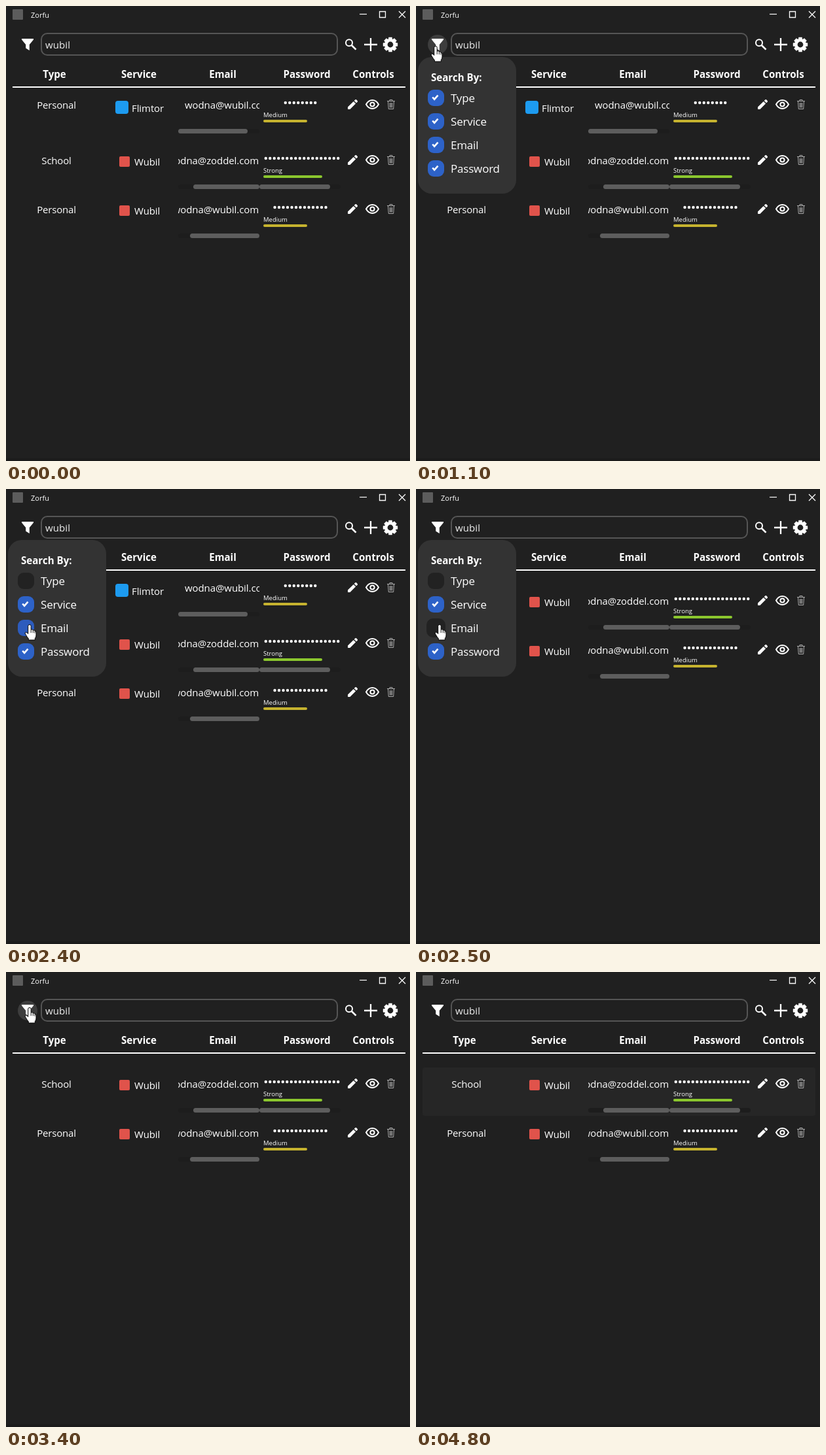
An HTML page with a canvas that plays this animation: 617 by 696 pixels, repeating every 5900 ms.

```html
<!DOCTYPE html>
<html lang="en">
<head>
<meta charset="utf-8">
<title>Password list</title>
<style>
html, body { margin: 0; width: 100%; height: 100%; overflow: hidden; background: #202020; }
canvas { display: block; }
</style>
</head>
<body>
<canvas id="stage" width="617" height="696"></canvas>
<script>
const ctx = document.getElementById('stage').getContext('2d');
const LOOP = 5900, STEP = 100;
const FONT = '"Open Sans", "Noto Sans", sans-serif';
const WHITE = '#fff';

const medium = { label: 'Medium', width: 67, color: '#c6b32f' };
const strong = { label: 'Strong', width: 90, color: '#8bc72e' };
const mail = { name: 'Wubil', color: '#e0534b', x: 173, y: 19, size: 16, textX: 196, base: 33 };
const bird = { name: 'Flimtor', color: '#1d9bf0', x: 167, y: 19, size: 20, textX: 192, base: 36 };

const rows = [
  { type: 'Personal', service: bird, email: 'wodna@wubil.com', left: 273, dots: 8, mid: 449.5,
    strength: medium, track: [263, 387], thumbs: [[263, 369]] },
  { type: 'School', service: mail, email: 'wodna@zoddel.com', dots: 18, mid: 452,
    strength: strong, track: [263, 511], thumbs: [[286, 387], [387, 495]] },
  { type: 'Personal', service: mail, email: 'wodna@wubil.com', dots: 13, mid: 449.5,
    strength: medium, track: [263, 387], thumbs: [[281, 387]] }
];

// label, top of the box, step at which it is switched off
const filters = [['Type', 128, 18], ['Service', 164, Infinity], ['Email', 200, 24], ['Password', 236, 28]];
const columns = [10, 139, 263, 387, 511, 610];

// pointer hot spot: step, x, y
const path = [
  [3, 605, 215], [5, 330, 150], [7, 70, 84], [8, 20, 67], [9, 30, 62], [14, 30, 62],
  [16, 33, 112], [17, 32, 142], [18, 32, 147], [20, 34, 187], [24, 36, 208], [27, 36, 208],
  [28, 40, 240], [29, 37, 234], [30, 37, 234], [33, 36, 57], [34, 36, 55], [36, 210, 62],
  [38, 490, 110], [39, 330, 150], [40, 215, 236], [42, 240, 287], [44, 150, 272],
  [45, 95, 250], [46, 280, 205], [47, 598, 165]
];

function pointer(step) {
  const i = path.findIndex(p => p[0] >= step);
  if (i < 0) return path[path.length - 1].slice(1);
  if (i === 0) return path[0].slice(1);
  const [a, ax, ay] = path[i - 1], [b, bx, by] = path[i];
  const k = (step - a) / (b - a);
  return [Math.round(ax + (bx - ax) * k), Math.round(ay + (by - ay) * k)];
}

function text(str, x, y, size = 15, { align = 'left', bold = false, gap = 0, color = WHITE } = {}) {
  ctx.font = `${bold ? 'bold ' : ''}${size}px ${FONT}`;
  ctx.letterSpacing = gap + 'px';
  ctx.textAlign = align;
  ctx.fillStyle = color;
  ctx.fillText(str, x, y);
}

function box(x, y, w, h, r, color) {
  ctx.fillStyle = color;
  ctx.beginPath();
  ctx.roundRect(x, y, w, h, r);
  ctx.fill();
}

function disc(x, y, r, color) {
  ctx.fillStyle = color;
  ctx.beginPath();
  ctx.arc(x, y, r, 0, Math.PI * 2);
  ctx.fill();
}

function stroke(d, color = WHITE, width = 2) {
  ctx.strokeStyle = color;
  ctx.lineWidth = width;
  ctx.stroke(new Path2D(d));
}

function fill(d, color = WHITE) {
  ctx.fillStyle = color;
  ctx.fill(new Path2D(d), 'evenodd');
}

function at(x, y, draw) {
  ctx.save();
  ctx.translate(x, y);
  draw();
  ctx.restore();
}

function gear() {
  ctx.fillStyle = WHITE;
  ctx.beginPath();
  for (let i = 0; i < 8; i++) {
    const a = i * Math.PI / 4;
    for (const [da, r] of [[-.36, 8.7], [-.23, 11.5], [.23, 11.5], [.36, 8.7]])
      ctx.lineTo(Math.cos(a + da) * r, Math.sin(a + da) * r);
  }
  ctx.closePath();
  ctx.moveTo(4.4, 0);
  ctx.arc(0, 0, 4.4, 0, Math.PI * 2);
  ctx.fill('evenodd');
}

function drawWindow(hoverFilter) {
  ctx.fillStyle = '#202020';
  ctx.fillRect(0, 0, 617, 696);
  ctx.fillStyle = '#1b1b1b';
  ctx.fillRect(0, 692, 617, 4);

  box(10, 5, 16, 16, 1, '#5c5c5c');
  text('Zorfu', 38, 18, 11);
  stroke('M540 12.5h11', WHITE, 1.2);
  stroke('M570.5 8.5h9v9h-9z', WHITE, 1.3);
  stroke('M600 8l10 10M610 8l-10 10', WHITE, 1.3);

  if (hoverFilter) disc(33, 59, 15, '#3d3d3d');
  fill('M24 50h18v1.5l-6.2 7.5v9l-5.6-3.5v-5.5L24 51.5z');

  ctx.beginPath();
  ctx.roundRect(54, 42, 452, 33, 9);
  ctx.strokeStyle = '#555';
  ctx.lineWidth = 2;
  ctx.stroke();
  text('wubil', 60, 65, 15, { gap: .1, color: '#eee' });

  stroke('M529 56.3a5 5 0 1 1-10 0a5 5 0 1 1 10 0');
  stroke('M527.8 60l6.7 6.7', WHITE, 2.6);
  stroke('M547 59h20M557 49v20', WHITE, 2.3);
  at(587, 59, gear);

  const heads = [['Type', 74], ['Service', 203], ['Email', 331], ['Password', 459.5], ['Controls', 561]];
  for (const [name, x] of heads) text(name, x, 110, 15.1, { align: 'center', bold: true });
  ctx.fillStyle = WHITE;
  ctx.fillRect(10, 123, 600, 2);
}

function controls() {
  fill('M522 158v-3.4l8.7-8.7l3.4 3.4l-8.7 8.7zM531.7 144.9l1.6-1.6q.9-.8 1.8 0l1.6 1.6q.8.9 0 1.8l-1.6 1.6z');
  stroke('M550 150.5Q553.5 144 559.5 144T569 150.5Q565.5 157 559.5 157T550 150.5z');
  stroke('M562.6 150.5a3.1 3.1 0 1 1-6.2 0a3.1 3.1 0 1 1 6.2 0');
  stroke('M582 145.5h12M586 145v-1.5h4v1.5M583.5 146l.8 11.5h7.4l.8-11.5M586.2 148l.3 7.5M588 148v7.5M589.8 148l-.3 7.5', '#aaa', 1);
}

function drawRow(row, top) {
  const { service: s, strength: p } = row;
  text(row.type, 77, top + 31, 15, { align: 'center', gap: -.2 });
  box(s.x, top + s.y, s.size, s.size, s === bird ? 4 : 2, s.color);
  text(s.name, s.textX, top + s.base, 15, { gap: -.1 });

  ctx.save();
  ctx.beginPath();
  ctx.rect(263, top, 124, 60);
  ctx.clip();
  if (row.left) text(row.email, row.left, top + 31, 15, { gap: -.1 });
  else text(row.email, 386, top + 31, 15, { gap: -.1, align: 'right' });
  ctx.restore();

  const pitch = 6.5, first = row.mid - (row.dots - 1) * pitch / 2;
  for (let i = 0; i < row.dots; i++) disc(first + i * pitch, top + 22, 2.2, WHITE);
  text(p.label, 393, top + 44, 9.5);
  box(393, top + 48, p.width, 4, 2, p.color);

  const [a, b] = row.track;
  box(a, top + 62, b - a, 7, 3.5, '#1d1d1d');
  for (const [x, end] of row.thumbs) box(x, top + 62, end - x, 7, 3.5, '#5d5d5d');
  at(0, top - 126, controls);
}

function drawHover(top, step) {
  const inside = s => { const y = pointer(s)[1]; return y >= top && y < top + 75; };
  const now = inside(step);
  if (!now && !inside(step - 1)) return;
  box(10, top, 600, 74, 4, now ? '#262626' : '#242424');
  if (!now || step > 47) return;
  const x = pointer(step)[0];
  const c = columns.findIndex((left, i) => x >= left && x < columns[i + 1]);
  if (c >= 0) box(columns[c], top + 4, columns[c + 1] - columns[c], 65, 4, '#2d2d2d');
}

function drawPopup(step, [px, py]) {
  box(3, 78, 150, 209, 21, '#333');
  text('Search By:', 23, 115, 15.1, { bold: true });
  for (const [name, y, off] of filters) {
    text(name, 53, y + 19, 17, { gap: -.2 });
    const hover = px >= 16 && px <= 45 && py >= y - 2 && py <= y + 27;
    const grow = hover && step > off ? 2 : 0;
    const fading = step === off && off !== 28;
    const color = step < off ? '#2d62c8' : fading ? '#2d5cbd' : '#222';
    box(18 - grow, y - grow, 25 + 2 * grow, 25 + 2 * grow, 9 + grow / 2, color);
    if (step < off) stroke(`M25.2 ${y + 11.5}l2.9 3.2l5.4-6`, WHITE, 2.6);
  }
}

function drawPointer([x, y], hand) {
  at(x, y, () => {
    ctx.lineJoin = 'round';
    const d = hand
      ? 'M-2.3 1.5Q-2.2-.5 0-.5T2.2 1.5V7Q4.8 6 5.4 8Q7.6 7.1 8.2 9.2Q10 9 10 11.4V16Q10 18.5 8.3 20.5V23H-1.7V20.8Q-3.5 18.8-5.2 15.8L-6.8 13.2Q-7.2 11.2-5.3 11.1Q-3.8 11.3-2.3 13.4z'
      : 'M0 0V16L3.7 12.6L6.2 18.5L8.8 17.4L6.3 11.7H11.4z';
    fill(d);
    stroke(d, '#000', 1);
    if (hand) stroke('M2.2 7v5M5.3 8v4.2M8 9.2v3.4', '#000', .9);
    ctx.lineJoin = 'miter';
  });
}

function draw(step) {
  const pos = pointer(step);
  const visible = step >= 3 && step <= 47;
  drawWindow(visible && Math.hypot(pos[0] - 33, pos[1] - 59) < 15);

  const narrowed = step >= 25;
  const list = narrowed ? rows.slice(1) : rows;
  const tops = narrowed ? [146, 221] : [126, 211, 286];
  if (step >= 40) tops.forEach(top => drawHover(top, step));
  list.forEach((row, i) => drawRow(row, tops[i]));

  if (step >= 11 && step < 34) drawPopup(step, pos);
  if (visible) drawPointer(pos, step >= 9 && step <= 34);
}

const start = performance.now();
function tick() {
  draw(Math.floor((performance.now() - start) % LOOP / STEP));
  requestAnimationFrame(tick);
}
tick();
</script>
</body>
</html>
```
